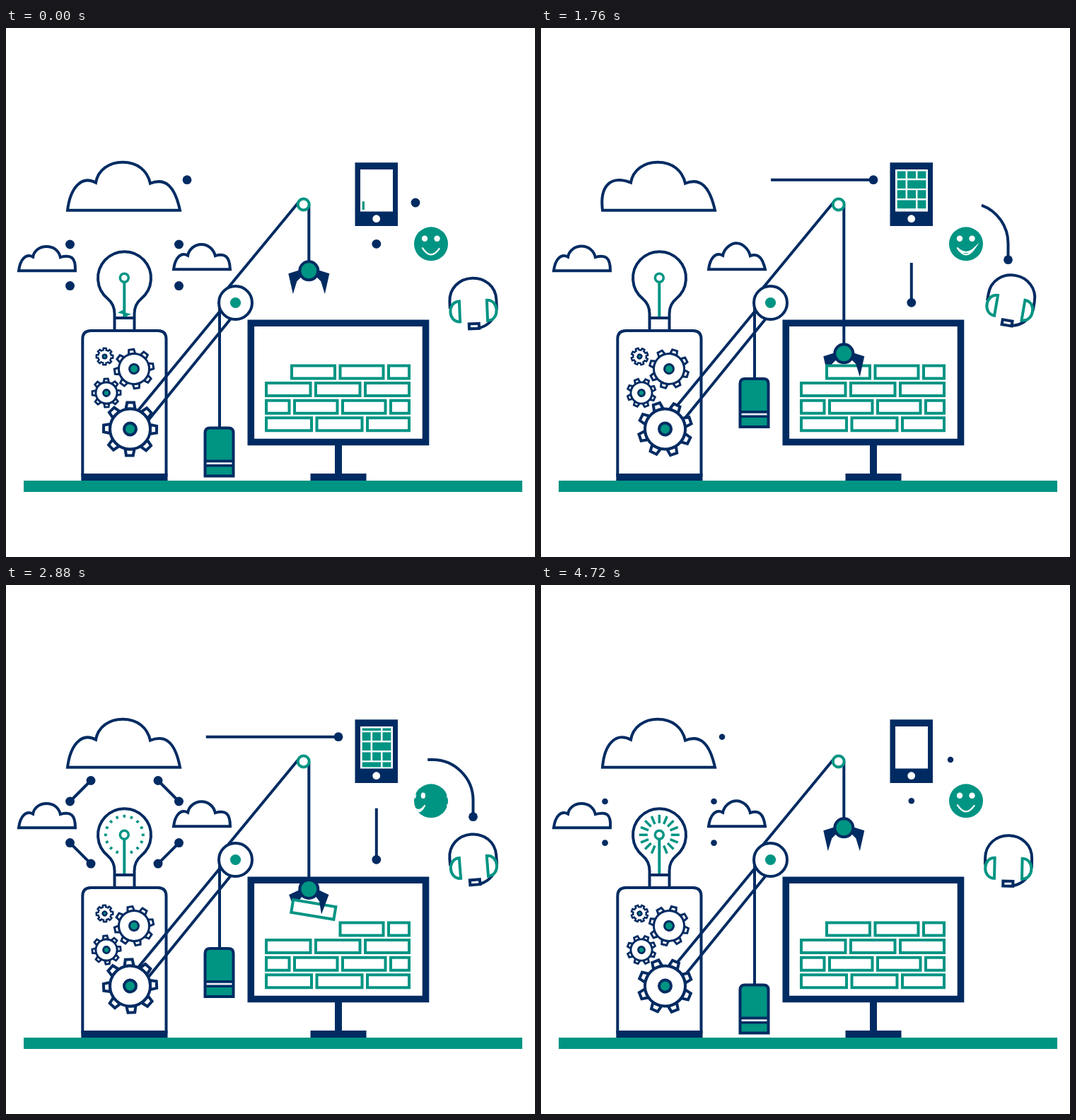
An HTML page with a canvas that plays this animation: 748 by 748 pixels, repeating every 4.76 s.

```html
<!DOCTYPE html>
<html>
<head>
<meta charset="utf-8">
<style>
  html, body { margin: 0; height: 100%; overflow: hidden; background: #fff; }
  canvas { display: block; }
</style>
</head>
<body>
<canvas id="stage" width="748" height="748"></canvas>
<script>
const NAVY = '#002b62', TEAL = '#009483', WHITE = '#fff';
const LOOP = 4760, WOBBLE = LOOP / 5, TAU = Math.PI * 2;
const c = document.getElementById('stage').getContext('2d');

// Timing helpers: linear rise, eased rise, and a soft bump around a moment.
const ramp = (t, from, to) => Math.max(0, Math.min(1, (t - from) / (to - from)));
function smooth(t, from, to) {
  const u = ramp(t, from, to);
  return u * u * (3 - 2 * u);
}
const bump = (d, half) => Math.abs(d) < half ? (1 + Math.cos(d / half * Math.PI)) / 2 : 0;

// Drawing helpers
function paint(path, fill, stroke, width = 4) {
  if (fill) { c.fillStyle = fill; c.fill(path); }
  if (stroke) { c.strokeStyle = stroke; c.lineWidth = width; c.stroke(path); }
}
const svg = (d, fill, stroke, width) => paint(new Path2D(d), fill, stroke, width);
function disc(x, y, r, fill, stroke, width) {
  if (r <= 0) return;
  const p = new Path2D();
  p.arc(x, y, r, 0, TAU);
  paint(p, fill, stroke, width);
}
function box(x0, y0, x1, y1, fill, stroke, width) {
  const p = new Path2D();
  p.rect(x0, y0, x1 - x0, y1 - y0);
  paint(p, fill, stroke, width);
}
function line(x0, y0, x1, y1, color = NAVY, width = 4) {
  svg(`M${x0} ${y0}L${x1} ${y1}`, null, color, width);
}
function at(x, y, degrees, draw) {
  c.save();
  c.translate(x, y);
  c.rotate(degrees * Math.PI / 180);
  draw();
  c.restore();
}

// Each side of a cloud swells in turn.
function cloud(t, x, y, scale, left, top, right) {
  const swell = peak => {
    const d = ((t - peak) % WOBBLE + WOBBLE * 1.5) % WOBBLE - WOBBLE / 2;
    return 11 * bump(d, 240);
  };
  const l = swell(left), h = swell(top) * scale, r = swell(right);
  const shape = new Path2D(`M0 0C${4 - l} ${-32 - l / 3} ${20 - l} -50 40 -39
    C43 -57 ${59 + h / 2} ${-68 - h} 78 ${-68 - h}
    C${99 - h / 2} ${-68 - h} 113 -56 117 -38
    C${137 + r} -46 ${151 + r} ${-36 - r / 3} 159 0Z`);
  const p = new Path2D();
  p.addPath(shape, new DOMMatrix([scale, 0, 0, scale, x, y]));
  paint(p, WHITE, NAVY);
}

function gear(x, y, r, outer, half, hub, width, angle) {
  at(x, y, angle, () => {
    const tooth = new Path2D(`M${-half} ${-r}L${-half * 0.75} ${-outer}H${half * 0.75}L${half} ${-r}Z`);
    for (let i = 0; i < 8; i++) {
      c.rotate(TAU / 8);
      paint(tooth, WHITE, NAVY, width);
    }
    disc(0, 0, r, WHITE, NAVY, width);
    disc(0, 0, hub, TEAL, NAVY, width);
  });
}

// The smallest gear is one outline around its teeth and body.
function smallGear(x, y, angle) {
  at(x, y, angle, () => {
    const p = new Path2D();
    for (let i = 0; i < 16; i++) {
      const r = i % 2 ? 9.3 : 11.8, a = i * TAU / 16;
      p.arc(0, 0, r, a - 0.17, a + 0.17);
    }
    p.closePath();
    paint(p, WHITE, NAVY, 2.5);
    disc(0, 0, 2.8, TEAL, NAVY, 2.5);
  });
}

function gears(t) {
  const angle = 1 + 0.0143 * t;
  smallGear(139.5, 464.5, angle);
  gear(181, 482, 21.5, 27.5, 4.7, 6.5, 3, angle - 9);
  gear(142, 516, 15, 20, 3.6, 4.5, 2.8, angle - 2);
  gear(175.5, 567, 28.5, 37.5, 6.5, 8.5, 4, angle);
}

// A spark climbs the filament, then rays shoot out of the ring.
function bulb(t) {
  const u = t % 2000, x = 167.3;
  svg('M153.5 427V404C153.5 395 150 388 144 383A37.5 37.5 0 1 1 191 383C185 388 181.5 395 181.5 404V427M153.5 410H181.5',
    WHITE, NAVY);
  line(x, 359, x, 408, TEAL);
  const head = 399 - 39 * ramp(u, 0, 150), tail = 408 - 48 * ramp(u, 80, 360);
  if (tail > head) {
    let d = `M${x} ${tail}`;
    for (let y = tail - 3, side = 6; y > head; y -= 3, side = -side) d += `L${x + side} ${y}`;
    svg(d + `L${x} ${head}`, null, TEAL, 2.5);
  }
  disc(x, 353.3, 6, WHITE, TEAL, 3.5);
  const from = 16.5 + 12 * ramp(u, 780, 930), to = 16.5 + 12 * smooth(u, 340, 480);
  for (let i = -7; i <= 7 && to > from; i++) {
    at(x, 353.3, i * 22.5, () => line(0, -from, 0, -to, TEAL, 3.5));
  }
}

function bulbLinks(t) {
  const u = t < 1880 ? t : t < 4600 ? t - 2000 : t - LOOP;
  const head = ramp(u, 60, 240), tail = ramp(u, 1320, 1520);
  const outer = 6.5 * (ramp(u, -120, 0) - ramp(u, 1220, 1320)) + 2.7 * bump(u - 720, 110);
  const inner = 6.5 * (ramp(u, 220, 320) - ramp(u, 1490, 1610));
  for (const sx of [-1, 1]) for (const sy of [-1, 1]) {
    const px = s => 167.5 + sx * (77 - 29.5 * s), py = s => 335.3 + sy * (29.3 + 29.5 * s);
    if (head > tail) line(px(tail), py(tail), px(head), py(head));
    disc(px(0), py(0), outer, NAVY);
    disc(px(1), py(1), inner, NAVY);
  }
}

function link(d, length, x0, y0, x1, y1, t) {
  const a = ramp(t, 1560, 2180) - ramp(t, 2320, 2960);
  const b = ramp(t, 40, 620) - ramp(t, 3840, 4400);
  if (b > a) {
    c.setLineDash([(b - a) * length, 999]);
    c.lineDashOffset = -a * length;
    svg(d, null, NAVY);
    c.setLineDash([]);
  }
  disc(x0, y0, 6.4 * (1 - ramp(t, 1460, 1560) + ramp(t, 2940, 3060) - ramp(t, 4400, 4500) + ramp(t, 4640, LOOP)), NAVY);
  disc(x1, y1, 6.4 * (ramp(t, 580, 680) - ramp(t, 3760, 3860)) + 2.7 * bump(t - 720, 110), NAVY);
}

function longLinks(t) {
  link('M256 214.7H470', 214, 256, 214.7, 470, 214.7, t);
  link('M523.8 305.3V388.3', 83, 523.8, 305.3, 523.8, 388.3, t);
  link('M579 247H603A57.5 57.5 0 0 1 660.5 304.5V327.7', 137.5, 579, 247, 660.5, 327.7, t);
}

// Bricks fill the screen one by one, scroll, and leave again.
function phone(t) {
  box(493.5, 190.3, 554, 280, NAVY);
  box(501, 200, 547, 259.5, WHITE);
  disc(523.7, 269.7, 5.4, WHITE);
  const shown = 10 * (ramp(t, -8, 640) - ramp(t, 4000, 4600));
  const scroll = 56.4 * ((smooth(t, 1100, 1840) + smooth(t, 2740, 3480)) % 1);
  c.save();
  c.beginPath();
  c.rect(503, 202.5, 43, 55);
  c.clip();
  let n = 0;
  for (let row = 0; row < 4; row++) {
    const wide = row % 2 ? -1 : row / 2;
    for (let col = 0; col < 3; col++) {
      const x = 503.7 + col * 14.4, y = 245.3 - row * 14.1 + scroll;
      const width = (col === wide ? 26.3 : 11.9) * ramp(shown, n, ++n);
      if (col === wide) col++;
      box(x, y, x + width, y + 11.7, TEAL);
      box(x, y - 56.4, x + width, y - 44.7, TEAL);
    }
  }
  c.restore();
}

// The face slides around the ball twice while the smile opens and closes.
function face(t) {
  const turn = 96 * ramp(t, 0, 3520) % 48;
  const open = Math.sin(t / LOOP * TAU) ** 2;
  disc(601, 305.3, 24, TEAL);
  c.save();
  c.beginPath();
  c.arc(601, 305.3, 24, 0, TAU);
  c.clip();
  c.lineCap = 'round';
  for (const dx of [turn - 48, turn]) {
    c.save();
    c.translate(601 + dx, 305.3);
    c.scale(1 - 0.35 * Math.min(1, Math.abs(dx) / 24), 1);
    disc(-9, -7.5, 4.2, WHITE);
    disc(8.5, -7.5, 4.2, WHITE);
    svg(`M-12 6Q0 24 12 6Q0 ${24 - 12 * open} -12 6`, null, WHITE, 2.3);
    c.restore();
  }
  c.restore();
}

function headset(t) {
  const s = Math.sin((t + 26) / WOBBLE * TAU);
  at(660.5 + 6 * Math.max(0, -s), 390 - 8 * Math.abs(s), -14 * s, () => {
    svg('M-33 7V-3C-33 -22 -18 -35 0 -35S33 -22 33 -3V9Q28 31 7 36', null, NAVY);
    svg('M-19.5 -3V26C-37 26 -37 -3 -19.5 -3Z', WHITE, TEAL);
    svg('M19.5 -3V26C37 26 37 -3 19.5 -3Z', WHITE, TEAL);
    box(-7, 29.5, 7, 36.5, WHITE, NAVY);
  });
}

const brick = (x0, y, x1) => box(x0, y, x1, y + 18, WHITE, TEAL);

function monitor() {
  box(346.3, 417.3, 593.5, 585.5, WHITE, NAVY, 9.6);
  box(465, 588, 475, 632, NAVY);
  box(430.5, 630, 509.5, 640, NAVY);
  // Each course has its own start and pitch, cut to the wall's edges.
  const courses = [[472.5, 68.5], [368, 70], [340, 68], [368, 71.5]];
  courses.forEach(([start, pitch], i) => {
    for (let x = start; x < 570; x += pitch) {
      brick(Math.max(368, x), 477.5 + 24.6 * i, Math.min(570, x + pitch - 7.5));
    }
  });
}

function arm(side, angle) {
  c.save();
  c.scale(side, 1);
  at(0, 0, angle, () => svg('M10 -2L29 4L22.5 33L17 15L11 9Z', NAVY));
  c.restore();
}

function crane(t) {
  const rise = smooth(t, 2720, 3200) + 0.07 * Math.sin(Math.PI * ramp(t, 3120, 3360));
  const drop = 117 * (smooth(t, 340, 1750) - rise);
  const lift = 0.594 * drop;
  const swing = -5 * Math.sin(ramp(t, 3160, 4560) * TAU) * (t < 3860 ? 1 : 0.5);
  const grip = 8 * (smooth(t, 1800, 2060) - smooth(t, 3800, 3920));

  line(302, 392, 302, 566 - lift);
  at(281.5, 565.5 - lift, 0, () => {
    svg('M0 68V7Q0 0 7 0H33Q40 0 40 7V68Z', TEAL, NAVY);
    box(0, 45, 40, 55, NAVY);
    box(2, 48.8, 38, 51.4, '#e6eef4');
  });

  line(313, 368.5, 414, 246);
  disc(324.5, 388.5, 23.5, WHITE, NAVY);
  disc(324.5, 388.5, 7.6, TEAL);

  const hang = draw => at(428.3, 250, swing, () => {
    c.translate(0, 93.3 + drop);
    draw();
  });
  hang(() => {
    line(0, -93.3 - drop, 0, 0);
    arm(-1, grip);
  });
  // The brick is lifted, carried, then falls back onto the wall.
  if (t > 2720 && t < 3860) {
    const tilt = smooth(t, 2720, 2880);
    hang(() => at(6.5, 27 + 2 * tilt, 9.5 * tilt, () => brick(-30.5, -9, 30.5)));
  } else {
    const fall = t < 3860 ? 1 : ramp(t, 3860, 4160) ** 2;
    brick(404, 360 + 117.5 * fall, 465);
  }
  hang(() => {
    arm(1, grip);
    disc(0, 0, 13, TEAL, NAVY);
  });
  disc(420.7, 249.5, 8, WHITE, TEAL);
}

function draw(t) {
  c.fillStyle = WHITE;
  c.fillRect(0, 0, 748, 748);
  box(25, 640, 730, 656, TEAL);
  bulb(t);
  svg('M108.3 634V440Q108.3 428 120 428H215Q226.5 428 226.5 440V634', WHITE, NAVY);
  box(106.3, 630, 228.5, 640, NAVY);
  line(180, 549, 312, 389);
  line(196, 561, 326, 401);
  gears(t);
  cloud(t, 87, 257.7, 1, 730, 510, 216);
  cloud(t, 18, 343.3, 0.503, 380, 640, 890);
  cloud(t, 237, 341.3, 0.503, 580, 820, 110);
  bulbLinks(t);
  longLinks(t);
  phone(t);
  face(t);
  headset(t);
  monitor();
  crane(t);
}

const began = performance.now();
function tick() {
  const t = (performance.now() - began) % LOOP;
  draw(Math.floor(t / 40) * 40);
  requestAnimationFrame(tick);
}
tick();
</script>
</body>
</html>
```
